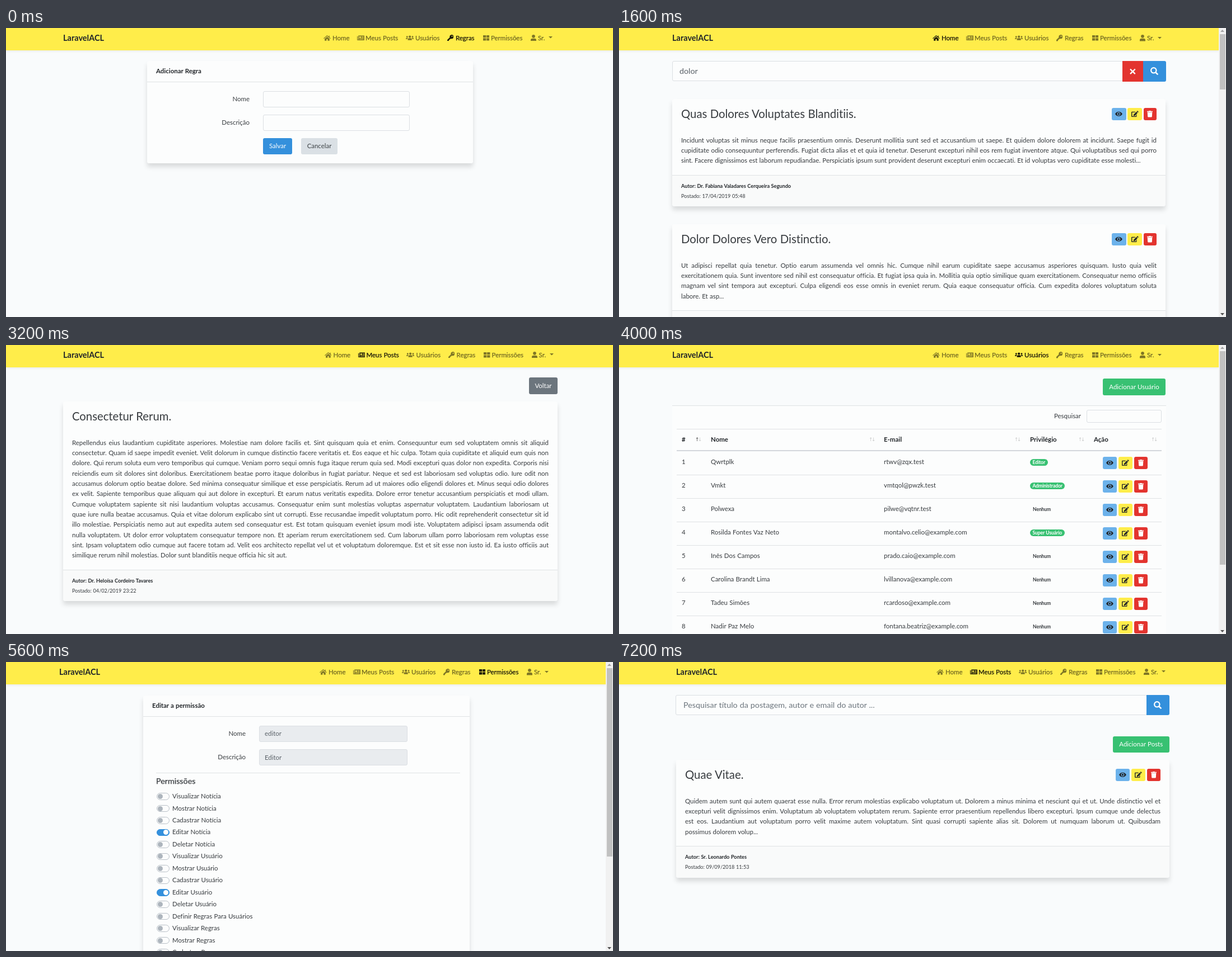
Animation, 1084 px wide and 517 px high, one loop 8 s. Source, as an HTML page:

```html
<!DOCTYPE html>
<html lang="pt-BR">
<head>
<meta charset="utf-8">
<title>LaravelACL</title>
<style>
html, body { margin: 0; width: 100%; height: 100%; overflow: hidden; }
body { position: relative; background: #f9fbfc; color: #373b3f; font: 11.46px/18.33px Lato, sans-serif; word-spacing: .03em; font-variant-ligatures: none; }
div, svg { position: absolute; box-sizing: border-box; }
svg { fill-rule: evenodd; }
.page { inset: 0; overflow: hidden; display: none; }
.text { white-space: pre; }
.text.bold { font-weight: 700; color: #212529; }
.medium { -webkit-text-stroke: .25px currentColor; }
.para div { position: static; height: 18.33px; }
.para div:not(:last-child) { text-align: justify; text-align-last: justify; word-spacing: 0; }
.card { background: #fcfdfd; border-radius: 3px; box-shadow: 0 6.4px 9px rgba(0,0,0,.13); }
.input { border: 1px solid #dbdfe3; border-radius: 3px; background: #fcfdfd; }
.button { display: flex; align-items: center; justify-content: center; border-radius: 3px; }
.badge { background: #38c172; color: #fff; border-radius: 6px; padding: 0 4.5px; height: 12.5px; }
.badge, .small { font-size: 8.6px; line-height: 12.5px; font-weight: 700; letter-spacing: -.1px; }
</style>
</head>
<body>
<script>
const BLUE = '#3490dc', SKY = '#6cb2eb', GREEN = '#38c172', RED = '#e3342f', YELLOW = '#ffed4a',
  DARK = '#212529', SOFT = '#3d4246', FIELD = '#5a6168', PALE = '#dae0e5', LINE = '#dfe2e4';

// Each icon: width on a 16 unit high grid, path
const ICONS = {
  home: [18, 'M9 1.5 0 9l1 1.3 8-6.7 8 6.7L18 9l-3-2.5v-4h-2v2.3zM9 5.2l-6 5V15h4.5v-4h3v4H15v-4.8z'],
  news: [18, 'M3 2h15v12H1.5Q0 14 0 12.5V4h1.5v8.5H3zM5 4.5V8h5V4.5zM11.5 4.5V6H16V4.5zM11.5 7v1.2H16V7zM5 10v1.5h11V10z'],
  users: [20, 'M10 2a3 3 0 1 1 0 6 3 3 0 0 1 0-6zM5 13.5V12q0-3.2 3-3.2h4q3 0 3 3.2v1.5zM3.2 3.2a2 2 0 1 1 0 4 2 2 0 0 1 0-4zM16.8 3.2a2 2 0 1 1 0 4 2 2 0 0 1 0-4zM0 11V9.8Q0 8 2 8h2.4Q6 8 5.3 9 4 9.6 3.9 11zM20 11V9.8Q20 8 18 8h-2.4q-1.6 0-.9 1 1.3.6 1.4 2z'],
  key: [16, 'M11 0a5 5 0 1 1-1.6 9.7L8 11H6.2v2h-2v2L3 16H0v-3l6.3-6.4A5 5 0 0 1 11 0zM12 2.6a1.4 1.4 0 1 0 0 2.8 1.4 1.4 0 0 0 0-2.8z'],
  grid: [16, 'M0 1.5h7.4v6H0zM8.6 1.5H16v6H8.6zM0 8.6h7.4v6H0zM8.6 8.6H16v6H8.6z'],
  user: [14, 'M7 0a4 4 0 1 1 0 8 4 4 0 0 1 0-8zM0 16v-2.5q0-4 4-4h6q4 0 4 4V16z'],
  caret: [12, 'M0 5h12l-6 6z'],
  eye: [18, 'M0 8Q3 2.5 9 2.5T18 8Q15 13.5 9 13.5T0 8zM9 4a4 4 0 1 0 0 8 4 4 0 0 0 0-8zM9 5.5a2.5 2.5 0 1 1 0 5 2.5 2.5 0 0 1 0-5z'],
  edit: [18, 'M10 2.5 8.5 4.2H2v9.5h9.5V10l1.6-1.6v5.8q-.1 1.3-1.4 1.3H1.5Q0 15.5 0 14V4q0-1.5 1.5-1.5zM12.5 2.6l2.9 2.9-7 7-3.2.4.4-3.2zM13.3 1.8 14.4.7q.8-.7 1.6 0L17.3 2q.7.8 0 1.6l-1.1 1.1z'],
  trash: [14, 'M0 1h4l.7-1h4.6L10 1h4v2H0zM1 4h12l-.7 10.5q-.1 1.5-1.5 1.5H3.2q-1.4 0-1.5-1.5z'],
  times: [12, 'M2 3l4 4 4-4 1.8 1.8-3.8 4 3.8 3.9-1.8 1.8-4-4-4 4-1.8-1.8L4 8.8.2 4.8z'],
  search: [16, 'M6.5 0a6.5 6.5 0 1 1 0 13 6.5 6.5 0 0 1 0-13zM6.5 2.5a4 4 0 1 0 0 8 4 4 0 0 0 0-8zM10 12l2-2 4 4-2 2z']
};

// Boxes take left, top, right, bottom; text and icons take left and vertical centre
const box = (l, t, r, b, css = '', cls = '', inner = '') =>
  `<div class="${cls}" style="left:${l}px;top:${t}px;width:${r - l}px;height:${b - t}px;${css}">${inner}</div>`;
const text = (x, y, s, css = '', cls = '') =>
  `<div class="text ${cls}" style="left:${x}px;top:${y - 9.2}px;${css}">${s}</div>`;
const right = (x, y, s) => text(x, y, s, 'transform:translateX(-100%)');
const size = px => `font-size:${px}px;`;
const rule = (l, r, y, css = LINE) => box(l, y, r, y + 1, `background:${css}`);
const svg = (name, px, color, css = '') => {
  const [w, d] = ICONS[name];
  return `<svg viewBox="0 0 ${w} 16" width="${w * px / 16}" height="${px}" fill="${color}" style="${css}"><path d="${d}"/></svg>`;
};
const icon = (name, x, y, color, px = 11.46) => svg(name, px, color, `left:${x}px;top:${y - px / 2}px`);
const button = (l, t, r, b, bg, label, color = '#fff', css = '') =>
  box(l, t, r, b, `background:${bg};color:${color};${css}`, 'button', label);
const iconButton = (l, t, r, b, bg, name, color, px = 11.46, css = '') =>
  button(l, t, r, b, bg, svg(name, px, color), color, css);
const input = (l, t, r, b, css) => box(l, t, r, b, css, 'input');
const card = (l, t, r, b) => box(l, t, r, b, '', 'card');

function nav(active, dx = 0, brandX = 102, y = 18, width = 1084) {
  const items = [['home', 567, 583, 'Home'], ['news', 627, 642, 'Meus Posts'], ['users', 713.5, 731, 'Usuários'],
    ['key', 788, 803, 'Regras'], ['grid', 851.5, 866, 'Permissões'], ['user', 937, 950, 'Sr.']];
  return box(0, 0, width, y + 21.5, `background:${YELLOW};box-shadow:0 2px 4px rgba(0,0,0,.06)`) +
    text(brandX, y, 'LaravelACL', size(14.5), 'bold') +
    items.map(([name, ix, tx, label], i) => {
      const color = `rgba(0,0,0,${i == active ? .9 : .5})`;
      return icon(name, ix + dx, y - .5, color) + text(tx + dx, y - .3, label, `color:${color}`, 'medium');
    }).join('') + icon('caret', 969 + dx, y - 1, 'rgba(0,0,0,.5)', 9.5);
}
const scrolledNav = active => nav(active, -7, 95, 18.5, 1071);

function scrollbar(top, bottom) {
  const arrow = (y, path, color) => `<svg width="8" height="5" style="left:1073.5px;top:${y}px"><path d="${path}" fill="${color}"/></svg>`;
  return box(1071, 0, 1084, 517, 'background:#f1f1f1') + box(1072.5, top, 1082.5, bottom, 'background:#c1c1c1') +
    arrow(3, 'M0 4h7L3.5 0z', top > 11 ? '#505050' : '#a3a3a3') + arrow(510, 'M0 0h7L3.5 4z', '#505050');
}

const actions = (x, y) =>
  iconButton(x, y, x + 25.5, y + 22, SKY, 'eye', DARK) +
  iconButton(x + 28.4, y, x + 53.8, y + 22, YELLOW, 'edit', DARK) +
  iconButton(x + 56.8, y, x + 80.2, y + 22, RED, 'trash', '#fff');

function post(x, y, width, title, body, author, date, actionX) {
  const lines = body.trim().split('\n'), l = x - 16, r = x + width + 16,
    foot = y + 54 + 18.33 * lines.length;
  return card(l, y - 27, r, foot + 56.5) +
    box(l, foot, r, foot + 56.5, `background:rgba(0,0,0,.012);border-top:1px solid ${LINE}`) +
    text(x, y - 1, title, size(20.3)) + (actionX ? actions(actionX, y - 11) : '') +
    box(x, y + 37.8, x + width, foot, '', 'para', lines.map(s => `<div>${s}</div>`).join('')) +
    text(x, foot + 20, 'Autor: ' + author, size(9.17), 'bold') +
    text(x, foot + 38, 'Postado: ' + date, size(9.17));
}

const ruleForm = () => nav(3) + card(252, 59, 834, 242) +
  text(268, 77, 'Adicionar Regra', '', 'bold') + rule(252, 834, 96) +
  right(435, 127, 'Nome') + input(459, 113, 721, 142) +
  right(435, 169, 'Descrição') + input(459, 155, 721, 184) +
  button(459, 197, 511, 226, BLUE, 'Salvar') + button(527, 197, 592, 226, PALE, 'Cancelar', SOFT);

const searchResults = () => scrolledNav(0) + input(95, 59, 900, 95) +
  text(108, 77.5, 'dolor', size(14.3) + `color:${FIELD}`) +
  iconButton(899, 59, 936, 95.5, RED, 'times', '#fff', 14.3, 'border-radius:0') +
  iconButton(936, 59, 977, 95.5, BLUE, 'search', '#fff', 14.3, 'border-radius:0 3px 3px 0') +
  post(111, 154, 849, 'Quas Dolores Voluptates Blanditiis.', `
Incidunt voluptas sit minus neque facilis praesentium omnis. Deserunt mollitia sunt sed et accusantium ut saepe. Et quidem dolore dolorem at incidunt. Saepe fugit id
cupiditate odio consequuntur perferendis. Fugiat dicta alias et et quia id tenetur. Deserunt excepturi nihil eos rem fugiat inventore atque. Qui voluptatibus sed qui porro
sint. Facere dignissimos est laborum repudiandae. Perspiciatis ipsum sunt provident deserunt excepturi enim occaecati. Et id voluptas vero cupiditate esse molesti...`,
    'Dr. Fabiana Valadares Cerqueira Segundo', '17/04/2019 05:48', 880) +
  post(111, 378, 849, 'Dolor Dolores Vero Distinctio.', `
Ut adipisci repellat quia tenetur. Optio earum assumenda vel omnis hic. Cumque nihil earum cupiditate saepe accusamus asperiores quisquam. Iusto quia velit
exercitationem quia. Sunt inventore sed nihil est consequatur officia. Et fugiat ipsa quia in. Mollitia quia optio similique quam exercitationem. Consequatur nemo officiis
magnam vel sint tempora aut excepturi. Culpa eligendi eos esse omnis in eveniet rerum. Quia eaque consequatur officia. Cum expedita dolores voluptatum soluta
labore. Et asp...`, '', '', 880) + scrollbar(11, 110);

const postView = () => nav(1, 1.6) + button(934, 58, 985, 88, '#6c757d', 'Voltar') +
  post(118, 128, 851, 'Consectetur Rerum.', `
Repellendus eius laudantium cupiditate asperiores. Molestiae nam dolore facilis et. Sint quisquam quia et enim. Consequuntur eum sed voluptatem omnis sit aliquid
consectetur. Quam id saepe impedit eveniet. Velit dolorum in cumque distinctio facere veritatis et. Eos eaque et hic culpa. Totam quia cupiditate et aliquid eum quis non
dolore. Qui rerum soluta eum vero temporibus qui cumque. Veniam porro sequi omnis fuga itaque rerum quia sed. Modi excepturi quas dolor non expedita. Corporis nisi
reiciendis eum sit dolores sint doloribus. Exercitationem beatae porro itaque doloribus in fugiat pariatur. Neque et sed est laboriosam sed voluptas odio. Iure odit non
accusamus dolorum optio beatae dolore. Sed minima consequatur similique et esse perspiciatis. Rerum ad ut maiores odio eligendi dolores et. Minus sequi odio dolores
ex velit. Sapiente temporibus quae aliquam qui aut dolore in excepturi. Et earum natus veritatis expedita. Dolore error tenetur accusantium perspiciatis et modi ullam.
Cumque voluptatem sapiente sit nisi laudantium voluptas accusamus. Consequatur enim sunt molestias voluptas aspernatur voluptatem. Laudantium laboriosam ut
quae iure nulla beatae accusamus. Quia et vitae dolorum explicabo sint ut corrupti. Esse recusandae impedit voluptatum porro. Hic odit reprehenderit consectetur sit id
illo molestiae. Perspiciatis nemo aut aut expedita autem sed consequatur est. Est totam quisquam eveniet ipsum modi iste. Voluptatem adipisci ipsam assumenda odit
nulla voluptatem. Ut dolor error voluptatem consequatur tempore non. Et aperiam rerum exercitationem sed. Cum laborum ullam porro laboriosam rem voluptas esse
sint. Ipsam voluptatem odio cumque aut facere totam ad. Velit eos architecto repellat vel ut et voluptatum doloremque. Est et sit esse non iusto id. Ea iusto officiis aut
similique rerum nihil molestias. Dolor sunt blanditiis neque officia hic sit aut.`,
    'Dr. Heloísa Cordeiro Tavares', '04/02/2019 23:22');

function userList() {
  const heads = [[112, '#', 137], [164, 'Nome', 447], [473, 'E-mail', 707], [734, 'Privilégio', 821], [848, 'Ação', 951]];
  const users = [
    ['Qwrtplk', 'rtwv@zqx.test', 'Editor'], ['Vmkt', 'vmtqol@pwzk.test', 'Administrador'],
    ['Polwexa', 'pilwe@vqtnr.test'], ['Rosilda Fontes Vaz Neto', 'montalvo.celio@example.com', 'Super Usuário'],
    ['Inês Dos Campos', 'prado.caio@example.com'], ['Carolina Brandt Lima', 'lvillanova@example.com'],
    ['Tadeu Simões', 'rcardoso@example.com'], ['Nadir Paz Melo', 'fontana.beatriz@example.com']];
  const arrow = (x, s, alpha) => text(x, 169, s, `font:9px/18.33px 'DejaVu Sans',sans-serif;color:rgba(0,0,0,${alpha})`);
  return scrolledNav(2) + button(864, 60, 976, 89.5, GREEN, 'Adicionar Usuário') +
    box(95, 108, 977, 540, `background:#fcfdfd;border-top:1px solid ${LINE}`) +
    text(777, 127, 'Pesquisar') + input(835, 115.5, 969, 138.5) + rule(103, 969, 150) +
    heads.map(([x, s, ax], i) => text(x, 169, s, '', 'bold') +
      arrow(ax - 1, '↑', i ? .2 : .7) + arrow(ax + 4, '↓', .2)).join('') +
    box(103, 188, 969, 189.5, 'background:#d3d7dc') +
    users.map(([name, mail, role], i) => {
      const y = 209 + 42 * i;
      return text(112, y, i + 1) + text(164, y, name) + text(473, y, mail) +
        (role ? text(734, y + 4, role, '', 'badge') : text(739, y + 4, 'Nenhum', '', 'small')) +
        actions(863.5, y - 9) + rule(103, 969, y + 22.5);
    }).join('') + scrollbar(11, 393);
}

const postForm = () => card(95, 16, 977, 516) +
  text(111, 34, 'Editar Posts', '', 'bold') + rule(95, 977, 53) +
  text(111, 78, 'Título') + input(111, 94, 960, 124) + text(121, 109.5, 'Eveniet Veritatis Rerum.', `color:${FIELD}`) +
  text(111, 145.5, 'Descrição') + input(111, 161, 960, 445.5) +
  text(121, 175.3, `Aliquam enim sint et quia aspernatur consectetur consequatur. Adipisci sunt nobis ut neque omnis fugit suscipit pariatur. Ea est iure dicta necessitatibus. Tempora
atque rerum rerum. Qui at consequatur nesciunt expedita quis placeat quos ducimus. Voluptates autem omnis sed deleniti. Quod cumque illum aliquid nobis
tempora repudiandae quibusdam. Sed nesciunt incidunt laudantium hic molestiae autem. Incidunt quaerat praesentium et numquam odio. At maiores illum et sint.
Sed molestiae qui ipsam laborum cupiditate est dicta. Repellat id adipisci est. Temporibus consequuntur blanditiis inventore voluptatum. Et ipsa blanditiis aut nemo
itaque similique nesciunt. Hic repellendus distinctio similique voluptates aut fugit animi neque. Eos dolores quis mollitia assumenda incidunt tenetur. Ut atque
ratione placeat culpa error. Consequatur modi dolorum aut nostrum odio. Nesciunt reiciendis consequatur libero nihil est molestiae commodi iure. Exercitationem
dolorem accusantium voluptas quisquam. Fugiat nihil perferendis ut modi fugiat. Iure enim unde officia molestiae recusandae. Repellendus non quia debitis
voluptatem dolore ea recusandae dignissimos. Saepe aut eius minima nostrum tempore. Nisi dolore in mollitia fuga quaerat. Vero explicabo vitae et aut
consequuntur illo. Architecto ut libero tempore fugit ad est. Ea ea molestiae sint molestiae voluptatem magni quia. Ad quam labore nulla quo facilis enim sequi quis.
Nisi quia ipsum ex libero. Veniam aut possimus beatae. Nostrum dolores omnis id exercitationem. Eius quia qui minus eveniet architecto et sit doloremque.
Consequatur ipsum corrupti aut perferendis quia. Qui voluptas eum iusto porro velit fuga aut. Reiciendis unde corrupti ut voluptatem. Odit numquam et velit. Hic et
et repudiandae. Iure fuga cupiditate libero atque consequatur molestias. Et omnis et modi vel sit. Reiciendis minus magni culpa labore explicabo. Alias voluptatem
autem placeat magnam. Iusto voluptas cumque explicabo sit minima.`, `color:${FIELD}`) +
  '<svg width="8" height="8" style="left:951px;top:437px"><path d="M0 7 7 0M4 7l3-3" stroke="#777" stroke-width=".8"/></svg>' +
  button(111, 459, 161, 488, GREEN, 'Editar') + button(177, 459, 228, 488, PALE, 'Voltar', SOFT) +
  scrollbar(46, 461);

function permissionForm() {
  const labels = [];
  for (const noun of ['Notícia', 'Usuário', 'Regras']) {
    for (const verb of ['Visualizar', 'Mostrar', 'Cadastrar', 'Editar', 'Deletar']) labels.push(`${verb} ${noun}`);
    if (noun == 'Usuário') labels.push('Definir Regras Para Usuários');
  }
  const toggle = (y, on) =>
    box(269, y - 6.2, 291.5, y + 6.3, `border-radius:7px;border:1px solid ${on ? BLUE : '#b9c0c7'};background:${on ? BLUE : '#fcfdfd'}`) +
    box(on ? 280.5 : 271, y - 4.5, on ? 289.5 : 280, y + 4.5, `border-radius:50%;background:${on ? '#fff' : '#adb5bd'}`);
  const field = (y, label, value) => right(428, y, label) +
    input(452, y - 14.5, 716.5, y + 15, 'background:#e9ecef') + text(462, y + .5, value, `color:${FIELD}`);
  return scrolledNav(4) + card(245, 59.5, 828, 560) +
    text(261, 78, 'Editar a permissão', '', 'bold') + rule(245, 828, 96.5) +
    field(128, 'Nome', 'editor') + field(170.2, 'Descrição', 'Editor') + rule(268, 811, 198) +
    text(268, 213, 'Permissões', size(14.3), 'medium') +
    labels.slice(0, 14).map((s, i) => {
      const y = 240.3 + 21.45 * i;
      return toggle(y + .3, i == 3 || i == 8) + text(297, y, s);
    }).join('') + scrollbar(11, 348);
}

const ownPosts = () => nav(1) + input(101, 59, 943, 94.5) +
  text(115, 77, 'Pesquisar título da postagem, autor e email do autor ...', size(14.3) + 'color:#6c757d') +
  iconButton(942, 59, 983, 94.5, BLUE, 'search', '#fff', 14.3, 'border-radius:0 3px 3px 0') +
  button(882, 132.5, 982.5, 162, GREEN, 'Adicionar Posts') +
  post(118, 202, 849, 'Quae Vitae.', `
Quidem autem sunt qui autem quaerat esse nulla. Error rerum molestias explicabo voluptatum ut. Dolorem a minus minima et nesciunt qui et ut. Unde distinctio vel et
excepturi velit dignissimos enim. Voluptatum ab voluptatem voluptatem rerum. Sapiente error praesentium repellendus libero excepturi. Ipsum cumque unde delectus
est eos. Laudantium aut voluptatum porro velit maxime autem voluptatum. Sint quasi corrupti sapiente alias sit. Dolorem ut numquam laborum ut. Quibusdam
possimus dolorem volup...`, 'Sr. Leonardo Pontes', '09/09/2018 11:53', 886.5);

const STEP = 800, ORDER = [0, 0, 1, 2, 2, 3, 4, 5, 6, 6];
const pages = [ruleForm, searchResults, postView, userList, postForm, permissionForm, ownPosts].map(draw => {
  const page = document.createElement('div');
  page.className = 'page';
  page.innerHTML = draw();
  document.body.append(page);
  return page;
});

const start = performance.now();
function frame() {
  const step = Math.floor((performance.now() - start) / STEP) % ORDER.length;
  pages.forEach((page, i) => page.style.display = i == ORDER[step] ? 'block' : 'none');
  requestAnimationFrame(frame);
}
frame();
</script>
</body>
</html>
```
